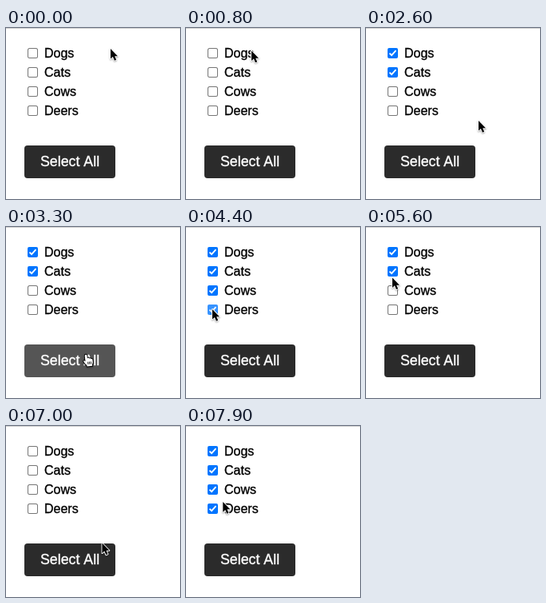
These frames come from a looping animation (218 px wide and 214 px high, 8 s). An HTML page with a canvas:

```html
<!DOCTYPE html>
<html lang="en">
<head>
<meta charset="utf-8">
<title>Select all checkboxes</title>
<style>
html, body { margin: 0; width: 100%; height: 100%; overflow: hidden; background: #fff; }
canvas { display: block; width: 218px; height: 214px; }
</style>
</head>
<body>
<canvas id="stage"></canvas>
<script>
const W = 218, H = 214, LOOP = 8000, STEP = 100, DWELL = 100;
const canvas = document.getElementById('stage');
const ctx = canvas.getContext('2d');
const ratio = window.devicePixelRatio || 1;
canvas.width = W * ratio;
canvas.height = H * ratio;
ctx.scale(ratio, ratio);

const FONT = '"Liberation Sans", Arial, sans-serif';
const LABELS = ['Dogs', 'Cats', 'Cows', 'Deers'];
const button = { x: 23, y: 147, w: 114, h: 41 };

// Stops of the pointer; those with a box index or "all" are clicks.
const rest = (at, x, y) => ({ at, x, y });
const tick = (at, box) => ({ at, x: 33, y: 31 + box * 24, box });
const selectAll = at => ({ at, x: 100, y: 160, all: true });
const stops = [
  rest(300, 131, 26), tick(1300, 0), tick(1900, 1),
  rest(2600, 141, 116), selectAll(3400),
  tick(4500, 3), tick(5200, 2), tick(5900, 1), tick(6300, 0),
  rest(6600, 158, 122), selectAll(7300), tick(8200, 2)
];

const mix = (a, b, k) => a + (b - a) * k;
const smooth = k => k * k * (3 - 2 * k);
const clamp = k => Math.max(0, Math.min(1, k));

// The pointer waits around each stop and eases to the next one.
function pointerAt(t) {
  const n = Math.max(1, stops.findIndex(s => s.at > t));
  const a = stops[n - 1], b = stops[n];
  const from = a.at + DWELL, to = b.at - DWELL;
  const k = smooth(clamp((t - from) / (to - from)));
  return { x: mix(a.x, b.x, k), y: mix(a.y, b.y, k) };
}

function isOver(t) {
  const { x, y } = pointerAt(t);
  return x >= button.x && x <= button.x + button.w &&
    y >= button.y && y <= button.y + button.h;
}

// Share of the last 200 ms spent over the button.
function hoverLevel(t) {
  let level = 0;
  for (let ago = 50; ago <= 200; ago += 50) level += isOver(t - ago) / 4;
  return level;
}

function isChecked(box, t) {
  return stops.filter(s => s.at <= t).reduce(
    (on, s) => s.all ? true : s.box === box ? !on : on, false);
}

const isPressed = (box, t) =>
  stops.some(s => s.box === box && t < s.at && t >= s.at - DWELL);

function fillRound(x, y, w, h, r, color) {
  ctx.fillStyle = color;
  ctx.beginPath();
  ctx.roundRect(x, y, w, h, r);
  ctx.fill();
}

function drawText(text, x, y, size, color) {
  ctx.font = `${size}px ${FONT}`;
  ctx.fillStyle = ctx.strokeStyle = color;
  ctx.lineWidth = 0.35;
  ctx.fillText(text, x, y);
  ctx.strokeText(text, x, y);
}

const checkMark = new Path2D('M2.5 6.6L5.1 9.2L10.5 3.2');

function drawItem(label, i, t) {
  ctx.save();
  ctx.translate(27, 25 + i * 24);
  if (isChecked(i, t)) {
    fillRound(0, 0, 13, 13, 2, isPressed(i, t) ? '#3793ff' : '#0075ff');
    ctx.strokeStyle = '#fff';
    ctx.lineWidth = 1.8;
    ctx.stroke(checkMark);
  } else {
    fillRound(0, 0, 13, 13, 2.5, '#767676');
    fillRound(1, 1, 11, 11, 1.5, '#fff');
  }
  drawText(label, 21, 12, 16, '#000');
  ctx.restore();
}

function drawButton(t) {
  const shade = Math.round(mix(43, 85, hoverLevel(t)));
  fillRound(button.x, button.y, button.w, button.h, 4,
    `rgb(${shade},${shade},${shade})`);
  drawText('Select All', 43, 173, 17.8, '#fff');
}

const arrow = new Path2D('M0 0V14L3.2 11L5.5 16.3L8 15.3L5.8 10.2H10Z');
const hand = new Path2D(
  'M-1.6 9V1.2Q-1.6 -.3 0 -.3Q1.5 -.3 1.5 1.2V5.6Q1.7 4.4 3 4.6Q4.1 4.8 4.1 6' +
  'Q4.6 5 5.6 5.3Q6.5 5.6 6.5 6.8Q7 6 7.8 6.4Q8.6 6.8 8.5 8.2V10.5' +
  'Q8.4 12.5 7.2 14.2V16.3H-.2V14.6Q-2 13 -3 11Q-4.6 9 -4.1 8Q-3.2 6.8 -1.6 9Z');
const knuckles = new Path2D('M1.7 10V13.5M3.7 10V13.5M5.7 10V13.5');

function drawPointer(t) {
  const { x, y } = pointerAt(t);
  const over = isOver(t);
  const shape = over ? hand : arrow;
  ctx.save();
  ctx.translate(x, y);
  ctx.scale(0.9, 0.9);
  if (over) ctx.rotate(-0.12);
  ctx.lineJoin = 'round';
  ctx.shadowColor = 'rgba(0,0,0,.35)';
  ctx.shadowBlur = 2 * ratio;
  ctx.shadowOffsetY = ratio;
  ctx.strokeStyle = over ? '#000' : '#fff';
  ctx.fillStyle = over ? '#fff' : '#000';
  ctx.lineWidth = 2;
  ctx.stroke(shape);
  ctx.shadowColor = 'transparent';
  ctx.fill(shape);
  if (over) {
    ctx.lineWidth = 0.9;
    ctx.stroke(knuckles);
  }
  ctx.restore();
}

function draw(t) {
  ctx.fillStyle = '#fff';
  ctx.fillRect(0, 0, W, H);
  ctx.fillStyle = '#d2d2d2';
  ctx.fillRect(0, 0, W, 1);
  LABELS.forEach((label, i) => drawItem(label, i, t));
  drawButton(t);
  drawPointer(t);
}

const start = performance.now();
function loop() {
  const t = (performance.now() - start) % LOOP;
  draw(Math.floor(t / STEP) * STEP);
  requestAnimationFrame(loop);
}
loop();
</script>
</body>
</html>
```
